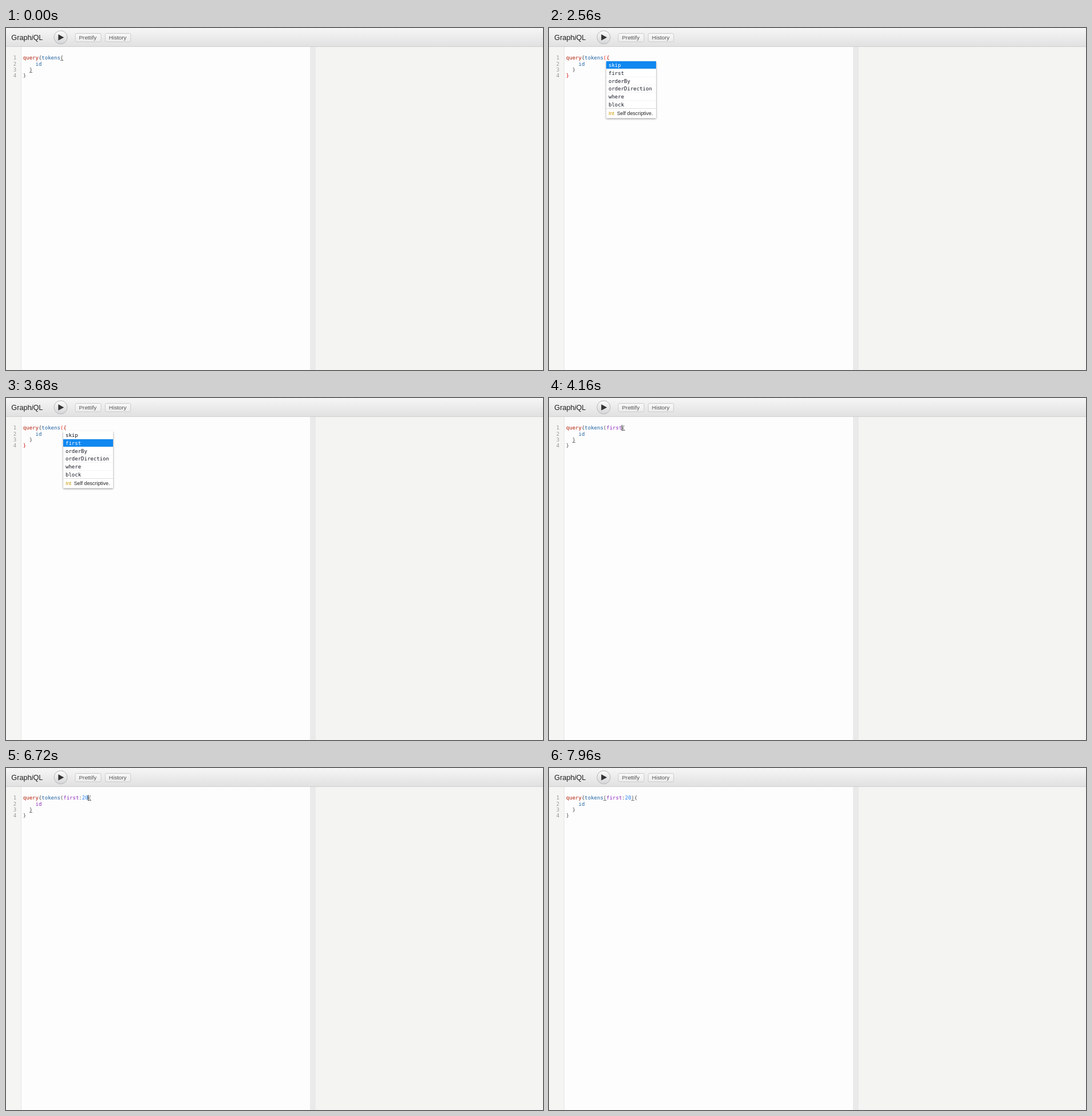
Write an HTML page with a canvas that moves like this. It is 938 px wide and 597 px high and loops after 8000 ms.

```html
<!DOCTYPE html>
<html lang="en">
<head>
<meta charset="utf-8">
<title>Query editor</title>
<style>
  html, body { margin: 0; width: 100%; height: 100%; overflow: hidden; }
  canvas { display: block; }
</style>
</head>
<body>
<canvas id="stage" width="938" height="597"></canvas>
<script>
const ctx = document.getElementById('stage').getContext('2d');
const LOOP = 8000, BLINK = 530;
const MONO = '9px "DejaVu Sans Mono", monospace';
const sans = (size, style = '') => `${style} ${size}px "Liberation Sans", Arial, sans-serif`;
const CHAR = 5.42, LEFT = 29.8;
const lineY = n => 55.2 + n * 10.4;

const RED = '#b11a04', BLUE = '#1f61a0', PURPLE = '#8b2bb9';
const NUMBER = '#2882f9', GREY = '#555', ERROR = '#f22';
const HINTS = ['skip', 'first', 'orderBy', 'orderDirection', 'where', 'block'];

// Keystrokes: time, argument text so far, highlighted hint
const KEYS = [
  { at: 310 - BLINK * 2 + 530, args: '' },
  { at: 1860, args: '(', hint: 0 },
  { at: 2920, args: '(', hint: 1 },
  { at: 3800, args: '(first' },
  { at: 4200, args: '(first:' },
  { at: 6240, args: '(first:2' },
  { at: 6440, args: '(first:20' },
  { at: 7200, args: '(first:20)' }
];

function rect(x, y, w, h, fill) {
  ctx.fillStyle = fill;
  ctx.fillRect(x, y, w, h);
}

function text(str, x, y, fill, font) {
  ctx.font = font;
  ctx.fillStyle = fill;
  ctx.fillText(str, x, y);
}

function fade(y0, y1, from, to) {
  const g = ctx.createLinearGradient(0, y0, 0, y1);
  g.addColorStop(0, from);
  g.addColorStop(1, to);
  return g;
}

function code(str, col, line, fill, underline) {
  const x = LEFT + col * CHAR, y = lineY(line);
  text(str, x, y, fill, MONO);
  if (underline) rect(x, Math.round(y + 0.6), CHAR, 1, '#777');
}

function button(label, x, w) {
  ctx.beginPath();
  ctx.roundRect(x + 0.5, 9.5, w, 14.5, 2);
  ctx.fillStyle = fade(9, 24, '#f9f9f9', '#ececec');
  ctx.fill();
  ctx.strokeStyle = '#cbcbcb';
  ctx.lineWidth = 1;
  ctx.stroke();
  text(label, x + 7, 19.6, '#555', sans(9.9));
}

function toolbar() {
  rect(0, 0, 938, 32, fade(0, 32, '#f6f6f6', '#e1e1e1'));
  rect(0, 32, 938, 1, '#d0d0d0');
  const size = 12.7;
  let x = 9.3;
  for (const [part, style] of [['Graph', ''], ['i', 'italic'], ['QL', '']]) {
    text(part, x, 20.5, '#202020', sans(size, style));
    x += ctx.measureText(part).width;
  }
  ctx.beginPath();
  ctx.arc(95.5, 16.3, 11.6, 0, Math.PI * 2);
  ctx.fillStyle = fade(5, 28, '#fbfbfb', '#d4d5d7');
  ctx.fill();
  ctx.strokeStyle = '#b6b6b6';
  ctx.lineWidth = 1;
  ctx.stroke();
  ctx.beginPath();
  ctx.moveTo(91.3, 11);
  ctx.lineTo(101.2, 16.4);
  ctx.lineTo(91.3, 21.8);
  ctx.fillStyle = '#333';
  ctx.fill();
  button('Prettify', 120.5, 45);
  button('History', 172.8, 44.5);
}

function panes() {
  rect(0, 33, 26, 564, '#f5f5f4');
  rect(26, 33, 1, 564, '#e6e6e6');
  rect(27, 33, 504, 564, '#fdfdfd');
  rect(531, 33, 10, 564, '#eaeaea');
  rect(541, 33, 397, 564, '#f4f5f3');
  for (let n = 0; n < 4; n++) text(String(n + 1), 12.8, lineY(n), '#999', MONO);
}

function query(args) {
  const open = args === '(', closed = args.endsWith(')');
  const matched = !open && !closed;
  const end = 12 + args.length;
  code('query', 0, 0, RED);
  code('{', 5, 0, GREY);
  code('tokens', 6, 0, BLUE);
  if (args) code('(', 12, 0, open ? ERROR : GREY, closed);
  code(args.slice(1, 6), 13, 0, PURPLE);
  code(args.slice(6, 7), 18, 0, GREY);
  code(args.slice(7, 9), 19, 0, NUMBER);
  if (closed) code(')', 21, 0, GREY, true);
  code('{', end, 0, open ? RED : GREY, matched);
  code('id', 4, 1, args.includes(':') && !closed ? PURPLE : BLUE);
  code('}', 2, 2, GREY, matched);
  code('}', 0, 3, open ? '#d01010' : GREY);
}

function popup(active) {
  ctx.save();
  ctx.shadowColor = 'rgba(0,0,0,.45)';
  ctx.shadowBlur = 3;
  ctx.shadowOffsetY = 1;
  rect(100, 57.5, 87, 100, '#fff');
  ctx.restore();
  HINTS.forEach((hint, i) => {
    const y = 58.2 + i * 13.8;
    if (i === active) rect(100, Math.round(y), 87, 13, '#1088f0');
    text(hint, 104, y + 9.8, i === active ? '#fff' : '#141823', MONO);
    if (i) rect(100, Math.round(y) - 1, 87, 1, '#f5f5f5');
  });
  rect(100, 140, 87, 1, '#dedede');
  text('Int', 104, 152.2, '#ca9800', sans(8.9));
  text('Self descriptive.', 118.7, 152.2, '#222', sans(8.9));
}

function draw(t) {
  const key = KEYS.findLast(k => k.at <= t);
  panes();
  toolbar();
  query(key.args);
  // The idle caret returns at 840 ms; every keystroke restarts the blink
  const since = key.args ? t - key.at : t - 840;
  if (since >= 0 && since % (2 * BLINK) < BLINK)
    rect(Math.round(LEFT + (12 + key.args.length) * CHAR - 0.3), 47, 1, 10, '#111');
  if (key.hint !== undefined) popup(key.hint);
}

function frame() {
  draw(performance.now() % LOOP);
  requestAnimationFrame(frame);
}
KEYS[0].at = 0;
frame();
</script>
</body>
</html>
```
